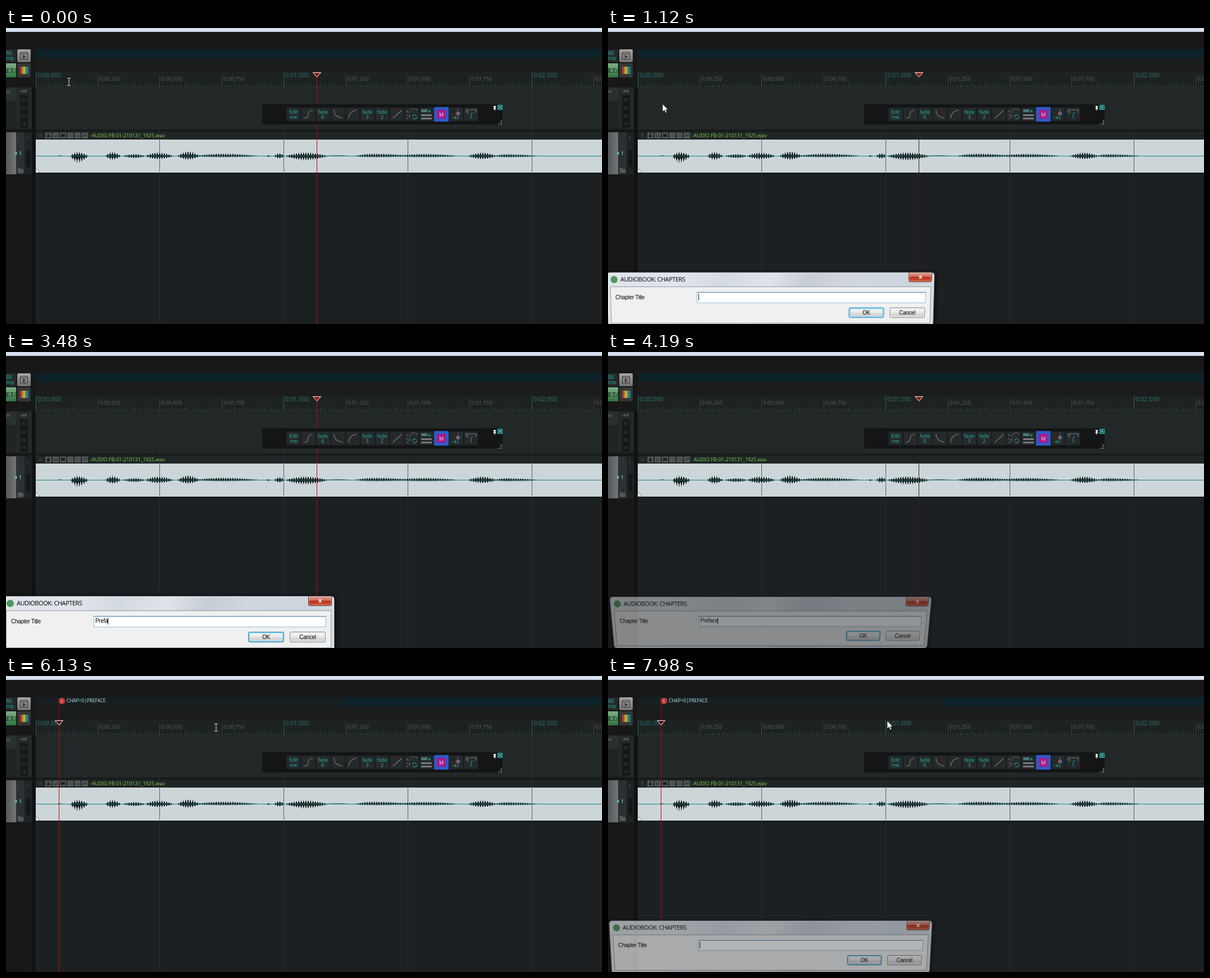
These frames come from a looping animation (1061x528 px, 8 s). An HTML page:

```html
<!DOCTYPE html>
<html lang="en">
<head>
<meta charset="utf-8">
<title>Chapter markers</title>
<style>
html, body { margin: 0; width: 100%; height: 100%; overflow: hidden; background: #181818; }
#stage { position: relative; width: 1061px; height: 528px; overflow: hidden; }
#scene { position: absolute; left: 0; top: 0; font-family: "Open Sans", "Noto Sans", sans-serif; }
.px { shape-rendering: crispEdges; }
.cyan { fill: #22b9b2; }
.pre, .post, .blinkA, .blinkB { animation: 8s step-end infinite; }
.pre { animation-name: pre; }
.post { animation-name: post; }
.blinkA { animation-name: blinkA; }
.blinkB { animation-name: blinkB; }
@keyframes pre { 0% { opacity: 1 } 52.4%, 100% { opacity: 0 } }
@keyframes post { 0% { opacity: 0 } 52.4%, 100% { opacity: 1 } }
@keyframes blinkA {
  0%, 10.25%, 19%, 28.75%, 40.25%, 100% { opacity: 1 }
  3.75%, 13.6%, 23.75%, 33.9%, 45.75% { opacity: 0 }
}
@keyframes blinkB {
  0%, 58.75%, 69.1%, 79.6%, 90% { opacity: 0 }
  52.4%, 63.9%, 74.4%, 86.3%, 95.25%, 100% { opacity: 1 }
}

#dialog {
  position: absolute; left: -6px; top: 435px; width: 591px; height: 98px; box-sizing: border-box;
  border: 1px solid #50585f; border-radius: 6px; transform-origin: 50% 35px;
  background: linear-gradient(115deg, #dfe5ea 0 22%, #d3dae1 34%, #dfe4e9 47%, #c6cdd5 58%, #d0d7de 70%, #cdd5dc 88%, #d8dfe5);
  box-shadow: inset 0 0 0 1px #eef2f5, 2px 2px 9px 2px rgba(0,0,0,.6);
  font: 10px "Liberation Sans", Arial, sans-serif; letter-spacing: -.3px; color: #000;
  animation: dialog 8s linear infinite;
}
#dialog > * { position: absolute; box-sizing: border-box; white-space: pre; }
@keyframes dialog {
  0%, 10.6% { opacity: 0; transform: perspective(370px) rotateX(-14deg) scale(.92) }
  11.75% { opacity: .4; transform: perspective(370px) rotateX(-10deg) scale(.943) }
  14% { opacity: 1; transform: perspective(370px) rotateX(-2deg) scale(.986) }
  15%, 51.25% { opacity: 1; transform: perspective(370px) rotateX(0deg) scale(1) }
  53.6%, 98.5% { opacity: 0; transform: perspective(370px) rotateX(-14deg) scale(.92) }
  99.75% { opacity: .66; transform: perspective(370px) rotateX(-4deg) scale(.969) }
  100% { opacity: .74; transform: perspective(370px) rotateX(-3.5deg) scale(.973) }
}
#icon { left: 6px; top: 6px; width: 13px; height: 13px; border-radius: 50%; background: #4f9660; }
#title { left: 24px; top: 4px; font: 11px/16px "Open Sans", "Noto Sans", sans-serif; letter-spacing: -.45px; }
#close {
  left: 543px; top: 0; width: 42px; height: 17px; border: 1px solid #5c2a26; border-top: 0; border-radius: 0 0 4px 4px;
  background: linear-gradient(#e3a596, #cf6b58 45%, #b5301b 50%, #cf5a3c);
  box-shadow: inset 0 0 0 1px rgba(255,255,255,.35); color: #fff; text-align: center; font: bold 10px/15px "DejaVu Sans", sans-serif;
}
#client { left: 5px; top: 25px; width: 579px; height: 67px; background: #f0f0f0; border: 1px solid #8f989f; }
#label { left: 14px; top: 39px; line-height: 12px; }
#field { left: 161px; top: 35px; width: 414px; height: 20px; background: #fff; border: 1px solid #8fbfdd; border-top-color: #3d7bad; padding: 2px 0 0 2px; line-height: 12px; }
#caret { display: inline-block; width: 1px; height: 12px; background: #000; vertical-align: top; }
.btn {
  top: 63px; width: 64px; height: 19px; border: 1px solid #7a7a7a; border-radius: 3px; text-align: center; line-height: 17px;
  background: linear-gradient(#f3f3f3, #ebebeb 48%, #dcdcdc 52%, #cfcfcf); box-shadow: inset 0 0 0 1px #fbfbfb;
}
#ok { left: 436px; border-color: #3c7fb1; box-shadow: inset 0 0 0 1px #4cc3ea; animation: pulse 1s ease-in-out infinite alternate; }
#cancel { left: 510px; }
@keyframes pulse { to { box-shadow: inset 0 0 0 2px #8fdcf6; } }

#mouse { position: absolute; left: 0; top: 0; width: 40px; height: 40px; overflow: visible; animation: move 8s linear infinite; }
@keyframes move {
  0%, .74% { transform: translate(112px, 96px) }
  .75%, 3.2% { transform: translate(109px, 96px) }
  5.25%, 12.4% { transform: translate(95px, 96px) }
  14% { transform: translate(97px, 135px) }
  20.5% { transform: translate(125px, 350px) }
  23.5% { transform: translate(172px, 462px) }
  27.5%, 61% { transform: translate(185px, 475px) }
  64.1% { transform: translate(470px, 350px) }
  66.9% { transform: translate(350px, 250px) }
  69.1% { transform: translate(345px, 240px) }
  72.5% { transform: translate(356px, 130px) }
  75% { transform: translate(373px, 97px) }
  76.6%, 78.5% { transform: translate(374px, 92px) }
  83%, 86% { transform: translate(444px, 90px) }
  90% { transform: translate(482px, 83px) }
  93%, 100% { transform: translate(497px, 80px) }
}
#beam, #arrow, #auto { animation: 8s step-end infinite; }
#beam { animation-name: beam; }
#arrow { animation-name: arrow; }
#auto { animation-name: auto; }
@keyframes beam {
  0% { opacity: 1; color: #e6e6e6 }
  10.25% { opacity: 0; color: #111 }
  26.5% { opacity: 1; color: #111 }
  37% { opacity: 0; color: #e6e6e6 }
  74.4% { opacity: 1; color: #e6e6e6 }
  97.9%, 100% { opacity: 0; color: #e6e6e6 }
}
@keyframes arrow {
  0%, 26.5%, 74.4% { opacity: 0 }
  10.25%, 52.4%, 97.9%, 100% { opacity: 1 }
}
@keyframes auto { 0%, 66.8%, 100% { opacity: 0 } 52.4% { opacity: 1 } }
</style>
</head>
<body>
<div id="stage">
<svg id="scene" width="1061" height="528">
  <defs>
    <linearGradient id="track"><stop stop-color="#555859"/><stop offset="1" stop-color="#727576"/></linearGradient>
    <linearGradient id="steel" x2="0" y2="1"><stop stop-color="#a5a5a5"/><stop offset="1" stop-color="#707070"/></linearGradient>
    <linearGradient id="moss" x2="0" y2="1"><stop stop-color="#7fae86"/><stop offset="1" stop-color="#2f7440"/></linearGradient>
  </defs>
  <g class="px">
    <path fill="#181818" d="M0 0h1061v528H0z"/>
    <path fill="#d6e0ef" d="M0 0h1061v6H0z"/><path fill="#c5cedb" d="M0 6h1061v1H0z"/>
    <path fill="#0d222a" d="M53 38h1008v15H53z"/>
    <path class="post" fill="#181f22" d="M53 38h543v15H53z"/>
    <path fill="#1b1c1c" d="M53 53h1008v25H53z"/>
    <path fill="#1e2221" d="M53 78h1008v28H53z"/>
    <path fill="#222827" d="M53 106h1008v75H53z"/>
    <path fill="#191b1b" d="M53 181h1008v4H53z"/>
    <path fill="#202526" d="M53 185h1008v75H53z"/>
    <path fill="#1d2022" d="M53 260h1008v268H53z"/>
    <path fill="#111" d="M47 106h5v422h-5z"/>
  </g>
  <path id="grid" class="px" stroke="#292e30"/>
  <path id="ticks" class="px" stroke="#2a4b4c"/>
  <g id="ruler"></g>

  <!-- left panel -->
  <path class="px" fill="#262828" d="M0 38h18v23H0z"/>
  <g class="cyan" font-size="8.8"><text x="-4" y="48">LBX</text><text x="-4" y="57">strip</text></g>
  <rect x="20" y="38" width="24" height="23" rx="2" fill="url(#steel)"/>
  <g fill="none" stroke="#333"><path d="M25.500 43.500h13v12h-13zM25 46.500h14"/><path fill="#333" d="M30.500 48.500l4 2.500-4 2.500z"/></g>
  <path class="px" fill="url(#moss)" d="M0 63h18v25H0z"/>
  <text x="-11" y="80" font-size="12" font-family="Liberation Serif, Times, serif" fill="#0b1a0d">META</text>
  <rect x="20" y="63" width="24" height="25" rx="2" fill="#353737"/>
  <g class="px"><path fill="#a8352d" d="M25 69h3v13h-3z"/><path fill="#c8792a" d="M28 69h3v13h-3z"/><path fill="#c2b838" d="M31 69h3v13h-3z"/><path fill="#3a9446" d="M34 69h3v13h-3z"/><path fill="#2a6eab" d="M37 69h3v13h-3z"/></g>
  <g class="px">
    <path fill="#2a2f30" d="M0 106h18v74H0z"/><path fill="#1f2425" d="M0 130h18v50H0z"/>
    <path fill="#232829" d="M18 106h28v74H18z"/><path fill="#161919" d="M25 120h14v58H25z"/>
    <path fill="url(#track)" d="M0 186h18v75H0z"/>
    <path fill="#2b3133" d="M18 186h15v75H18z"/><path fill="#1f2325" d="M33 186h13v75H33z"/>
    <path fill="#121414" d="M36 218h3v30h-3zM40 218h3v30h-3z"/>
  </g>
  <g font-size="8" fill="#777"><text x="0" y="116">W</text><text x="25" y="115" fill="#999">-inf</text><text x="36" y="199" fill="#555">T</text></g>
  <g font-size="7" fill="#474c4c"><text x="25" y="130">-30-</text><text x="25" y="145">-42-</text><text x="25" y="159">-30-</text><text x="25" y="173">-18-</text></g>
  <circle cx="18" cy="223.500" r="2" fill="#3fd5d8"/>
  <text x="23" y="227" font-size="9" fill="#e4e4e4">1</text>
  <path fill="#555b5c" d="M21 250h4l1 1.500h5v7H21z"/>

  <!-- media item -->
  <g id="badges" font-size="7"></g>
  <text x="150" y="195" font-size="8.900" fill="#79d84c">-AUDIO FB-01-210131_1925.wav</text>
  <g class="px">
    <path fill="#ccd6d9" d="M53 199h1008v59H53z"/>
    <path fill="#14181a" d="M53 258h1008v2H53z"/>
    <path id="dots" stroke="#222" stroke-dasharray="2 1"/>
  </g>
  <path id="wave" fill="#121617"/>
  <path class="px" fill="#12897d" d="M53 228h1008v1H53z"/>
  <path fill="#fff" stroke="#555" stroke-width=".7" d="M53 250l7 8h-7z"/>

  <!-- edit cursor -->
  <g class="pre">
    <path class="px" stroke="#45191c" d="M553.500 88V528"/>
    <path class="px blinkA" stroke="#b80a14" d="M553.500 88V528"/>
    <path fill="#9a1414" stroke="#f2f2f2" d="M546.500 79.500h14l-7 8z"/>
  </g>
  <g class="post">
    <path class="px" stroke="#a30d0d" d="M94.500 50V86"/>
    <path class="px" stroke="#6e1114" d="M94.500 86V528"/>
    <path class="px blinkB" stroke="#b80a0e" d="M94.500 86V528"/>
    <path fill="#5c1010" stroke="#f2f2f2" d="M87.500 79.500h14l-7 8z"/>
    <rect x="94" y="39" width="11" height="11" rx="4.500" fill="#c23a36"/>
    <text x="97.300" y="47.500" font-size="8" fill="#fff">1</text>
    <text x="108" y="47.300" font-size="8.300" fill="#b9e8e8">CHAP=0|PREFACE</text>
  </g>

  <!-- floating toolbar -->
  <path class="px" fill="#131516" d="M456 136h428v36H456z"/>
  <g id="tools" fill="#25292a"></g>
  <g id="captions" class="cyan" font-size="8.800" text-anchor="middle"></g>
  <g fill="none" stroke="#757a7b" stroke-width="1.200">
    <path d="M530 161q8 0 8-7t8-7M584 146q0 13 15 14.500M610 161q1-13 15-14.500M689 161l15-14"/>
    <path stroke-dasharray="3 2" d="M713 147q4 6 8 0t11 0M713 154q4 5 7 0M714 162l5-5"/>
    <path d="M819 151v-5h18v5M822 147v6"/>
    <path stroke="#1d8f8a" d="M724 159a3.500 3.500 0 0 1 6-3M731 158a3.500 3.500 0 0 1-6 3M828 162v-8q0-3 4-3M794 160h6"/>
  </g>
  <path fill="#757a7b" d="M739 154h19v3h-19zM739 160h19v3h-19z"/>
  <path fill="#4f7775" d="M739 145h11v5h-11z"/>
  <path fill="#1d8f8a" d="M752 146l5 2.500-5 2.500zM799 157l4 3-4 3z"/>
  <path stroke="#5c6162" d="M804.500 144v20"/><path fill="#b5443a" d="M804.500 148v9l-4.500-4.500z"/><path fill="#3a7fb8" d="M804.500 148v9l4.500-4.500z"/>
  <path class="px" fill="#2a5bcb" d="M762 141h26v26H762z"/>
  <path class="px" fill="#a61c88" d="M767 146h16v16H767z"/>
  <text x="775" y="157.500" font-size="9" fill="#f3d9ee" text-anchor="middle">M</text>
  <path fill="#eee" d="M867.500 139h5v1l-1 .5v3l1.500 1.500h-2.500v2.500h-1V145H867l1.500-1.500v-3l-1-.5z"/>
  <path fill="#0d5a5c" stroke="#2cc6c4" d="M875.500 137.500h8v8h-8z"/><path stroke="#d7ffff" d="M877.500 139.500l4 4M881.500 139.500l-4 4"/>
  <path class="px" fill="#ddd" d="M881 165h2v1h-2zM879 168h1v1h-1zM881 168h2v1h-2zM876 171h1v1h-1zM879 171h1v1h-1zM881 171h2v1h-2z"/>
</svg>

<div id="dialog">
  <div id="icon"></div><div id="title">AUDIOBOOK: CHAPTERS</div><div id="close">x</div>
  <div id="client"></div><div id="label">Chapter Title</div>
  <div id="field"><span id="typed"></span><span id="caret"></span></div>
  <div id="ok" class="btn">OK</div><div id="cancel" class="btn">Cancel</div>
</div>

<svg id="mouse">
  <path id="beam" fill="none" stroke="currentColor" d="M-3 -6.500h2.500l.5 .5.500-.5H3M0 -6V6M-3 6.500h2.500l.5-.5.500.5H3"/>
  <g id="arrow">
    <path fill="#fff" stroke="#111" stroke-width=".7" d="M0 0v14l3.300-3 2.300 5 2.300-1-2.200-4.800H10z"/>
    <text id="auto" x="10" y="21" font-family="Open Sans, sans-serif" font-size="11" font-weight="bold" fill="#fff">A</text>
  </g>
</svg>
</div>

<script>
const $ = id => document.getElementById(id);
const SEC = 441.7, X0 = 53;

// Ruler
let ticks = '', labels = '';
for (let i = 0; i < 229; i++) {
  const x = Math.floor(X0 + i * SEC / 100) + .5;
  ticks += `M${x} ${i % 5 ? 102 : 99}V106`;
}
for (let q = 0; q < 10; q++) {
  const x = Math.floor(X0 + q * SEC / 4), major = q % 4 === 0;
  const name = `0:0${Math.floor(q / 4)}.${String(q % 4 * 250).padStart(3, '0')}`;
  labels += `<path class="px" stroke="${major ? '#226467' : '#404545'}" d="M${x + .5} ${major ? 77 : 84}V106"/>` +
    `<text x="${x + 3}" y="${major ? 88 : 94}" font-size="${major ? 10.7 : 9.5}" fill="${major ? '#2a7475' : '#5c6060'}">${name}</text>`;
}
$('ticks').setAttribute('d', ticks);
$('ruler').innerHTML = labels;

const halves = [273.5, 494.5, 715.5, 936.5];
$('grid').setAttribute('d', halves.map(x => `M${x} 106V528`).join(''));
$('dots').setAttribute('d', halves.map(x => `M${x} 200V257`).join(''));

// Waveform bursts: start, peak, end, height above, height below
const bursts = [
  [90, 95, 101, 1, 0], [114, 127, 146, 7, 11], [176, 189, 204, 7, 6], [207, 230, 247, 3, 3],
  [247, 270, 298, 6, 5], [305, 323, 345, 8, 6], [335, 385, 449, 4, 1.5], [463, 466, 471, 1, 1],
  [477, 486, 495, 5, 4], [497, 532, 572, 6, 7], [565, 590, 614, 1, 0], [620, 655, 725, 4, 1.5],
  [690, 745, 805, 3.5, 1.5], [822, 848, 873, 6, 5], [868, 890, 948, 3, 1.5]
];
let wave = '';
for (let x = 85; x < 950; x++) {
  let up = 0, down = 0;
  for (const [a, p, b, u, d] of bursts) {
    if (x <= a || x >= b) continue;
    const k = x < p ? (x - a) / (p - a) : (b - x) / (b - p);
    const e = Math.sin(k * Math.PI / 2);
    up = Math.max(up, u * e);
    down = Math.max(down, d * e);
  }
  if (!up) continue;
  const beat = Math.pow(.5 + .5 * Math.cos(x * 2 * Math.PI / 4.2), 1.4);
  const top = up * (.2 + .8 * beat), low = down * (.25 + .75 * beat);
  wave += `M${x} ${(228 - top).toFixed(1)}h1V${(229 + low).toFixed(1)}h-1z`;
}
$('wave').setAttribute('d', wave);

// Item buttons and toolbar
$('badges').innerHTML = '<circle cx="61.500" cy="191.500" r="3.500" fill="#2f3535"/>' + [70, 83, 96, 109, 122, 135].map((x, i) =>
  `<rect x="${x}" y="186.500" width="11" height="10.500" fill="#515657"/>` + [
    `<path fill="#1d2021" d="M${x + 3} 191h5v4h-5zM${x + 4} 191v-3h3v3h-1v-2h-1v2z"/>`,
    `<text x="${x + 2.3}" y="194.500" fill="#1d2021">M</text>`,
    `<path fill="#1d2021" d="M${x + 2} 189h7v5h-4l-2 2v-2h-1z"/>`,
    `<path fill="#3b4041" d="M${x + 5} 188h1v7h-1z"/>`,
    `<text x="${x + 1.5}" y="194.500" fill="#303536">FX</text>`,
    `<path fill="none" stroke="#1d2021" d="M${x + 2} 194l3-4 2 3 2-4"/>`
  ][i]).join('');
$('tools').innerHTML = Array.from({length: 13}, (_, i) =>
  `<rect x="${(499.5 + i * 26.3).toFixed(1)}" y="142" width="25" height="24" rx="1"/>`).join('');
$('captions').innerHTML = [[512, 'Edit', 'me'], [564, 'fade', '6'], [643, 'fade', '3'], [669.5, 'fade', '2']].map(([x, a, b]) =>
  `<text x="${x}" y="153">${a}</text><text x="${x}" y="161.500">${b}</text>`).join('');

// Typing
const word = 'Preface', keys = [2990, 3220, 3300, 3380, 3460, 3700, 3850];
function frame(now) {
  const t = now % 8000;
  const n = t < 4400 ? keys.filter(k => t >= k).length : 0;
  $('typed').textContent = word.slice(0, n);
  const on = n || t > 7000 || (t - 860) % 1060 < 530;
  $('caret').style.opacity = on ? 1 : 0;
  requestAnimationFrame(frame);
}
requestAnimationFrame(frame);
</script>
</body>
</html>
```
